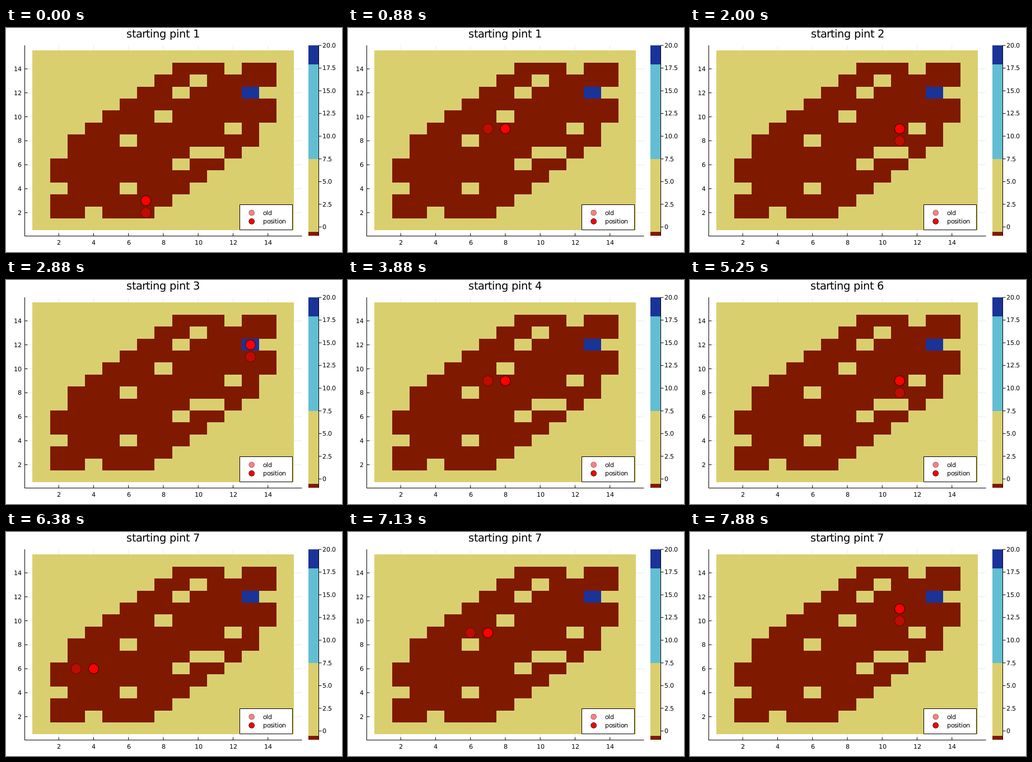
Animation, 600 px wide and 400 px high, one loop 8000 ms. Source, as a matplotlib script:

```python
import numpy as np
import matplotlib.pyplot as plt
from matplotlib.animation import FuncAnimation
from matplotlib.colors import ListedColormap
from matplotlib.patches import Circle, PathPatch, Rectangle
from matplotlib.path import Path
from matplotlib.textpath import TextPath

plt.rcParams["font.family"] = "DejaVu Sans"

W, H, DPI = 600, 400, 100
PX = 72 / DPI  # one pixel in points
SMALL, LARGE = 8 / PX, 14 / PX  # font sizes in pixels
BROWN, SAND, CYAN, BLUE = "#7f1900", "#dacf6e", "#62bed3", "#1a3399"

# Rows from y = 15 down to y = 1
GRID = """
...............
........###.##.
.......##.####.
......##.###G..
.....#########.
....###.######.
...########.#..
..###.#######..
..#######..#...
.#######.##....
.#########.....
..###.###......
.#######.......
.##.###........
...............
""".split()

# Start cell and moves of each run
RUNS = [
    ((7, 2), "UUUUUUURRRRUURRU"),
    ((11, 8), "UUURRU"),
    ((14, 11), "LU"),
    ((7, 2), "UUUUUUURRRRUURRU"),
    ((13, 10), "UU"),
    ((11, 8), "UUURRU"),
    ((3, 3), "UUURUUURRRRRRRUU"),
]
STEP = {"U": (0, 1), "D": (0, -1), "L": (-1, 0), "R": (1, 0)}


def px(x):
    return 33.48 + (x - 0.05) * 31.13


def py(y):
    return 371.5 - (y - 0.05) * 21.4


def walk():
    frames = []
    for run, (cell, moves) in enumerate(RUNS, 1):
        for m in moves:
            new = (cell[0] + STEP[m][0], cell[1] + STEP[m][1])
            frames.append((run, cell, new))
            cell = new
    return frames


def right(s, size):
    return TextPath((0, 0), s, size=size).get_extents().x1


def text_path(s, size, x, y, align=0):
    """Outline of s with whole-pixel advances; align 0 left, .5 centre, 1 right."""
    glyphs, pen = [], 0
    for c in s:
        if c != " ":
            glyphs.append(TextPath((pen, 0), c, size=size))
        pen += int(right(c + "|", size) - right("|", size))
    path = Path.make_compound_path(*glyphs)
    x0 = np.floor(x - align * path.get_extents().x1)
    return Path(path.vertices * [1, -1] + [x0, round(y)], path.codes)


fig = plt.figure(figsize=(W / DPI, H / DPI), dpi=DPI, facecolor="white")
ax = fig.add_axes([0, 0, 1, 1])
ax.set_xlim(0, W)
ax.set_ylim(H, 0)
ax.axis("off")


def line(x, y, width=1, **kw):
    ax.plot(x, y, color="black", lw=width * PX, solid_capstyle="butt",
            snap=False, **kw)


def label(x, y, s, size=SMALL, align=0):
    patch = PathPatch(text_path(s, size, x, y, align), fc="black", lw=0,
                      snap=False, zorder=6)
    return ax.add_patch(patch)


def box(x0, y0, x1, y1, **kw):
    ax.add_patch(Rectangle((x0, y0), x1 - x0, y1 - y0, snap=False, **kw))


def dot(x, y, r, alpha=1):
    c = Circle((x, y), r, fc=(1, 0, 0, alpha), ec=(0, 0, 0, alpha),
               lw=0.7 * PX, zorder=5)
    return ax.add_patch(c)


# Axes, ticks and faint grid
for t in range(2, 15, 2):
    x, y = px(t), py(t)
    line([x, x], [31, 371], 0.8, alpha=0.1, zorder=0)
    line([34, 528], [y, y], 0.8, alpha=0.1, zorder=0)
    line([x, x], [371.5, 366.5], zorder=3)
    line([33.5, 38.5], [y, y], zorder=3)
    label(x + 0.5, 387, str(t), align=0.5)
    label(27.5, y + 4, str(t), align=1)
line([33.5, 33.5], [31, 372], zorder=3)
line([33, 528.5], [371.5, 371.5], zorder=3)

# Maze
codes = np.array([[".#G".index(c) for c in row] for row in GRID[::-1]])
edges = np.arange(16) + 0.5
ax.pcolormesh(np.round(px(edges)), np.floor(py(edges)), codes,
              cmap=ListedColormap([SAND, BROWN, BLUE]), vmin=0, vmax=2,
              antialiased=False, zorder=1)

# Colour bar
bounds = [31, 65, 234, 364, 371]
for top, bottom, c in zip(bounds, bounds[1:], [BLUE, CYAN, SAND, BROWN]):
    box(540, top, 558, bottom, fc=c, lw=0)
line([558.5, 558.5], [31, 371], zorder=3)
for v in np.arange(0, 20.1, 2.5):
    y = 371.5 - (v + 1) * 16.21
    line([558.5, 563.5], [y, y], zorder=3)
    label(565, y + 3.8, f"{v:.1f}" if v else "0")

# Legend
box(417.5, 315.5, 511.5, 360.5, fc="white", ec="black", lw=PX, zorder=4)
for y, s, a in [(330, "old", 0.5), (345.3, "position", 1)]:
    dot(438.7, y, 4.9, a)
    label(459, y + 4, s)


def title_path(run):
    return text_path(f"starting pint {run}", LARGE, 280.75, 17, 0.5)


title = ax.add_patch(PathPatch(title_path(1), fc="black", lw=0, snap=False))
old = dot(0, 0, 8.95, 0.5)
pos = dot(0, 0, 8.95)
FRAMES = walk()


def draw(i):
    run, a, b = FRAMES[i]
    title.set_path(title_path(run))
    old.center = px(a[0]), py(a[1])
    pos.center = px(b[0]), py(b[1])
    return title, old, pos


anim = FuncAnimation(fig, draw, frames=len(FRAMES), interval=125,
                     repeat=True, repeat_delay=0)
plt.show()
```
